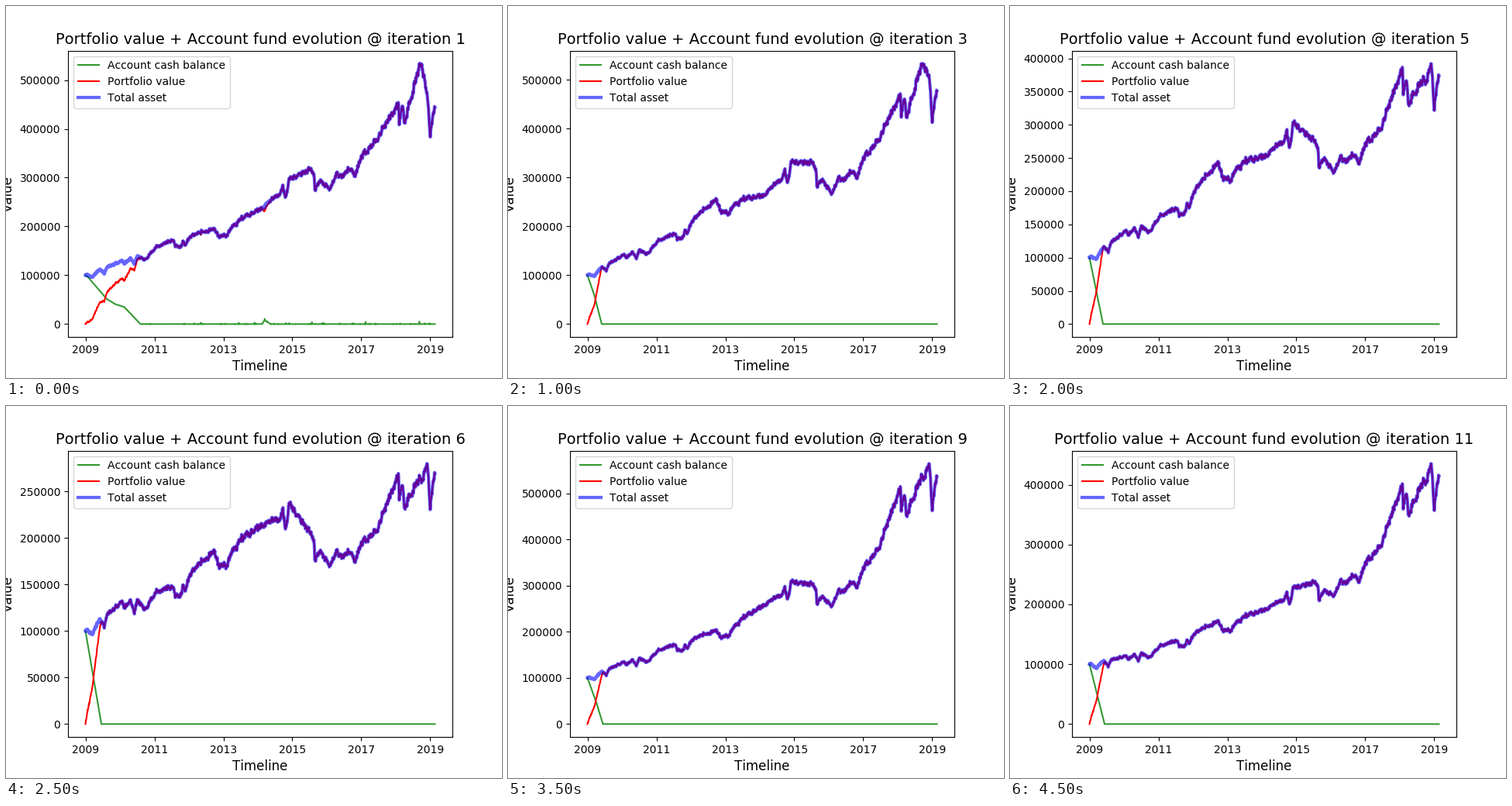
These frames come from a looping animation (640x480 px, 5000 ms). A matplotlib script:

```python
import numpy as np
import matplotlib.pyplot as plt
from matplotlib.animation import FuncAnimation

plt.rcParams["text.kerning_factor"] = 6

END = 451         # time steps on the axis
DAYS = 3704       # calendar days they cover, from the last day of 2008

t = np.linspace(0, END, 2550)

# Times at which the runs set their own level, after a common start at 100
KNOTS = [0, 48, 114, 166, 227, 264, 290, 315, 376, 404, 434, 441, 451]

# Market setbacks shared by all runs: begin, bottom, end, depth
DIPS = [(2, 9, 16, .09), (19, 24, 28, .10), (48, 50, 58, .06),
        (58, 63, 67, .12), (67, 76, 92, .11), (114, 116, 141, .09),
        (119, 122, 126, .05), (126, 129, 133, .06), (166, 173, 205, .11),
        (177, 181, 190, .04), (243, 250, 255, .04), (255, 258, 263, .10),
        (295, 296, 304, .10), (315, 325, 330, -.06), (341, 348, 356, .08),
        (404, 405, 410, .10), (408, 412, 430, .13), (441, 445, 451, .15)]


def jitter(rng, keep=0.75, size=0.0085):
    steps = rng.normal(0, size * np.sqrt(1 - keep ** 2), t.size)
    out = np.zeros(t.size)
    for i in range(1, t.size):
        out[i] = keep * out[i - 1] + steps[i]
    return out


rng = np.random.default_rng(4)
MARKET = 1 + jitter(rng)
for begin, bottom, end, depth in DIPS:
    MARKET *= 1 - depth * np.interp(t, [begin, bottom, end], [0, 1, 0])
BLIPS = np.where(rng.random(t.size) < 0.03, rng.exponential(0.8, t.size), 0)


def run(spend, *levels):
    """Cash, total and peak in thousands; spend lists (time, cash left)."""
    cash = np.interp(t, *zip(*spend))
    total = np.interp(t, KNOTS, (100,) + levels) * MARKET
    peak = max(levels)
    return cash, np.minimum(total, peak), peak


def blend(a, b):
    cash, total = (a[0] + b[0]) / 2, (a[1] + b[1]) / 2
    return cash, total, total.max()


def straight(end):
    return [(0, 100), (end, 0)]


slow = [(0, 100), (4, 95), (27, 52), (38, 41), (50, 35), (66, 8), (71, 0),
        (228, 0), (231, 8), (239, 0)]

run1 = run(slow, 129, 173, 195, 235, 296, 316, 276, 378, 453, 533.55, 468, 448)
run1 = (run1[0] + np.where(t > 71, BLIPS, 0),) + run1[1:]
run2 = run([(0, 100), (9, 67), (18.5, 0)],
           149, 205, 271, 284, 367, 379, 309, 454, 569, 649.7, 634, 594)
run4 = run(straight(18), 134, 167, 239, 238, 294, 280, 224, 301, 372, 416.3, 375, 368)
run5 = run(straight(17.5), 140, 175, 243, 251, 301, 275, 228, 294, 386, 364, 392, 377)
run6 = run(straight(20.5), 131, 148, 186, 212, 235, 205, 170, 208, 269, 262, 280, 272)
run9 = run([(0, 100), (11, 49), (20, 0)],
           134, 173, 203, 255, 307, 302, 255, 381, 514, 534, 564.3, 541)
run11 = run(straight(19.5), 113, 140, 172, 190, 227, 236, 214, 298, 401, 404, 435.2, 418)

RUNS = [(1, run1), (2, run2), (3, blend(run2, run4)), (4, run4), (5, run5),
        (6, run6), (8, blend(run6, run9)), (9, run9), (10, blend(run9, run11)),
        (11, run11)]

fig, ax = plt.subplots(figsize=(6.4, 4.8), dpi=100)
cash_line, = ax.plot([], [], color="green", alpha=0.8, label="Account cash balance")
stock_line, = ax.plot([], [], color="red", label="Portfolio value")
total_line, = ax.plot([], [], color="blue", alpha=0.6, lw=3, label="Total asset")

years = range(0, 11, 2)
ax.set_xlim(-0.05 * END, 1.05 * END)
ax.set_xticks([(1 + k * 1461 // 4) * END / DAYS for k in years], [str(2009 + k) for k in years])
ax.set_xlabel("Timeline", fontsize=12)
ax.set_ylabel("Value", fontsize=12)
ax.legend(loc="upper left")


def draw(i):
    number, (cash, total, peak) = RUNS[i]
    cash_line.set_data(t, cash * 1000)
    stock_line.set_data(t, (total - cash) * 1000)
    total_line.set_data(t, total * 1000)
    ax.set_ylim(-50 * peak, 1050 * peak)
    ax.set_title(f"Portfolio value + Account fund evolution @ iteration {number}", fontsize=14)
    return cash_line, stock_line, total_line


anim = FuncAnimation(fig, draw, frames=len(RUNS), interval=500, repeat=True, repeat_delay=0)
plt.show()
```
